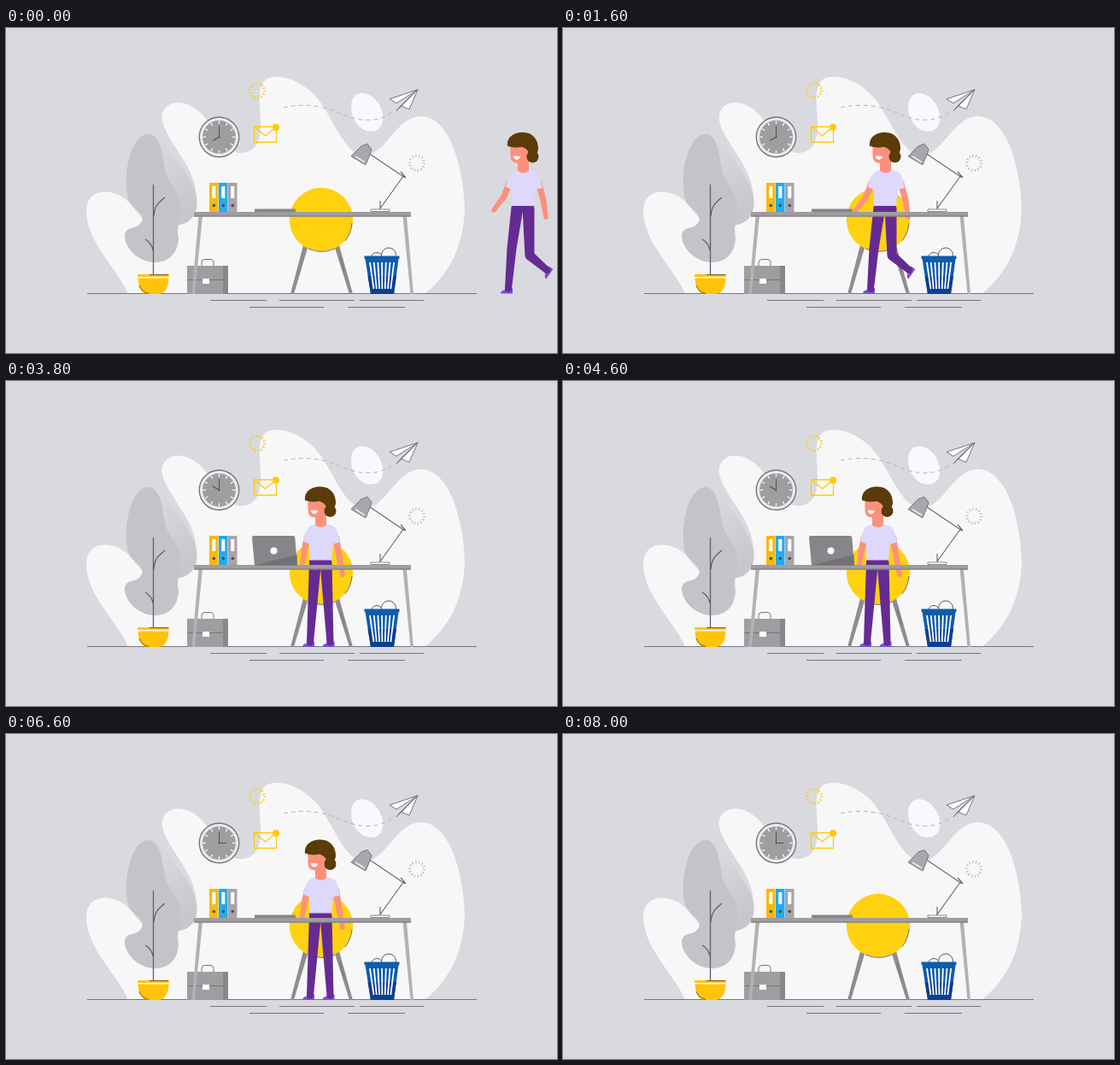
Animation of 645x380 px, one loop 8.2 s. Source, as an HTML page:

```html
<!DOCTYPE html>
<html lang="en">
<head>
<meta charset="utf-8">
<title>A day at the office</title>
<style>
html, body { margin: 0; width: 100%; height: 100%; overflow: hidden; background: #d9dadf; }
svg { display: block; width: 645px; height: 380px; }
.line { fill: none; stroke: #77747a; stroke-width: 1; }
</style>
</head>
<body>
<svg viewBox="0 0 645 380">
  <defs>
    <linearGradient id="shade" x1="0" y1="0" x2=".3" y2="1">
      <stop offset=".2" stop-color="#d7d8dc"/><stop offset="1" stop-color="#c6c6cb"/>
    </linearGradient>
  </defs>
  <!-- backdrop -->
  <path fill="#f7f7f8" d="M143 311C132 283 93 250 94 212C96 186 126 187 143 203C160 222 165 234 188 234C214 232 229 208 220 180C212 153 184 126 182.500 105C183 88 201 83 216 91C242 103 250 146 276 146C293 145 299 131 298 109C297 88 294 70 303 61C317 50 352 62 369 88C385 111 398 149 420 149C447 146 456 104 486 103C523 105 536 172 537 212C535 258 518 288 490 311Z"/>
  <path fill="#f9f9fd" d="M404 92C404 80 412 74 422 77C434 81 443 96 441 109C439 121 427 124 417 118C408 112 404 102 404 92Z"/>
  <path fill="url(#shade)" d="M180 126C192 145 217 172 223 197C226 218 216 230 197 231L175 200Z"/>
  <path fill="#c3c3c9" d="M168 124C181 126 183 148 186 166C190 184 203 189 204 207C205 222 199 231 202 246C201 264 190 275 172 274C154 273 138 256 139 242C141 230 154 237 159 226C163 216 148 212 143 200C136 172 146 123 168 124Z"/>
  <g class="line">
    <path stroke-width="1.300" stroke="#5f5f64" d="M172.500 290V183M173 220C174 207 179 204 186 198M172 260Q171 252 163 247"/>
    <path d="M95 310.500H551M239 318.500H305M320 318.500H408M414 318.500H489M285 326.500H372M400 326.500H467"/>
    <path stroke="#b5b5ba" stroke-dasharray="5 4" d="M325 93C350 87 375 92 392 100C412 109 434 112 453 98"/>
    <path fill="#fff" stroke-linejoin="round" d="M482 72L449 83L457 88ZL457 97L462 91ZL462 91L472 95Z"/>
  </g>
  <path fill="#ffc40a" d="M154 288H191V291H154ZM154.500 292.500H190.500C190 304 186 311 178 311H167C159 311 155 304 154.500 292.500Z"/>
  <path fill="none" stroke="#6b5a20" d="M168 288.500H190M156 301Q159 309 167 310.500"/>

  <circle cx="294" cy="73" r="8.500" fill="none" stroke="#ffca18" stroke-width="3" stroke-dasharray="1.300 2.510"/>
  <circle cx="481" cy="158" r="8.500" fill="none" stroke="#bbbbc0" stroke-width="3" stroke-dasharray="1.200 2.610"/>
  <path fill="none" stroke="#ffc907" stroke-width="1.300" d="M290.500 115.500H316.500V133.500H290.500ZL303.500 126L316 116"/>
  <circle cx="316" cy="116" r="4" fill="#ffc907"/>

  <g transform="translate(249.500 127.500)">
    <circle r="23.200" fill="#ececef" stroke="#77747a" stroke-width="1.400"/>
    <circle r="19.500" fill="#a09da1"/>
    <g id="ticks" stroke="#fff" stroke-width="1.200"></g>
    <path stroke="#4e4e53" d="M0 1V-13"/>
    <path id="hour" stroke="#4e4e53" d="M0 1V-8.500"/>
  </g>

  <!-- furniture behind the woman -->
  <g id="folders"></g>
  <path fill="#a09da1" d="M212 278H260V311H212Z"/>
  <path fill="#8a878c" d="M254 278H260V311H254Z"/>
  <path class="line" d="M229 278V274Q229 270.500 233 270.500H239Q243 270.500 243 274V278M212 294.500H254"/>
  <path fill="#fff" d="M230 293H238V299H230Z"/>
  <path fill="#8f8c92" d="M348 254H354L337 311H333ZM384 254H390L406 311H402Z"/>
  <circle cx="369" cy="224" r="37.200" fill="#ffd10f"/>
  <path class="line" d="M354 258Q369 265 385 258M391 267L396 285M405 228Q404 240 397 249"/>
  <g fill="#f8f8fa" stroke="#55585f"><circle cx="434" cy="269" r="6.500"/><circle cx="448" cy="265.500" r="8.500"/></g>
  <path fill="#0d5cae" d="M419.500 266.500H460.500V270H459.500L454 311H427L420.500 270H419.500Z"/>
  <path fill="#0b3f90" d="M423.500 290H457L454 311H427Z"/>
  <g id="slats" stroke="#fff" stroke-width="1.800"></g>

  <g id="woman"></g>

  <!-- desk, lamp and laptop in front -->
  <path fill="#b2b1b7" d="M225.500 220H230L221 311H217.500ZM464.500 220H469L477 311H473.500Z"/>
  <path fill="#a09da1" d="M220 215H474V220.500H220Z"/>
  <path class="line" d="M220 220H474"/>
  <path fill="none" stroke="#6c6a70" stroke-width="1.200" d="M438 211L466 172M467 175L424 146M438 202V212M462 168L468 175"/>
  <path fill="#a9a7ac" stroke="#77747a" d="M404 150L416 138L423 135.500L428 142L426 148L421 160Z"/>
  <path stroke="#e9e9ec" stroke-width="1.500" d="M409 150L420 157"/>
  <path fill="#fff" stroke="#8b898e" d="M427 212H449V214.500H427Z"/>
  <path id="closed" fill="#87858a" d="M291 211.500H339V215H291Z"/>
  <g id="open">
    <path fill="#87858a" d="M290 181H336Q338 181 338.300 183L341 215.500H291L288 183Q288 181 290 181Z"/>
    <path fill="#737177" d="M340.500 203L341 215.500H291Z"/>
    <circle cx="313.500" cy="198.500" r="4" fill="#fff"/>
  </g>
</svg>
<script>
const LOOP = 8200, STEP = 200;
const SKIN = '#fb917c', HAIR = '#5b3b08', SHIRT = '#ddd8fc', PANTS = '#652b93', SHOE = '#7951d8';
const $ = id => document.getElementById(id);
const path = (d, fill) => `<path fill="${fill}" d="${d}"/>`;
const move = (x, y, inner, flip = 1) => `<g transform="translate(${x} ${y}) scale(${flip} 1)">${inner}</g>`;
const repeat = (count, make) => Array.from({ length: count }, (_, i) => make(i)).join('');

$('ticks').innerHTML = repeat(12, i => `<path d="M0 -19V-15.500" transform="rotate(${i * 30})"/>`);
$('slats').innerHTML = repeat(7, i => `<path d="M${426 + i * 4.7} 274L${430.5 + i * 3.3} 305"/>`);
$('folders').innerHTML = ['#f9b90a', '#20abf2', '#a7a5aa'].map((fill, i) =>
  move(238 + i * 11, 181, path('M0 0H10.500V34H0Z', fill) + path('M3.300 4H7.300V18H3.300Z', '#fff') +
    '<circle cx="5.300" cy="26.500" r="1.800" fill="#51465a"/>')).join('');

// Tapered segment with a round far end.
function limb([x1, y1], [x2, y2], w1, w2, fill) {
  const len = Math.hypot(x2 - x1, y2 - y1), nx = (y1 - y2) / len / 2, ny = (x2 - x1) / len / 2;
  return path(`M${x1 + nx * w1} ${y1 + ny * w1}L${x2 + nx * w2} ${y2 + ny * w2}` +
    `A${w2 / 2} ${w2 / 2} 0 0 0 ${x2 - nx * w2} ${y2 - ny * w2}L${x1 - nx * w1} ${y1 - ny * w1}Z`, fill);
}

function leg(hip, knee, foot, tilt = 0) {
  const shoe = `<path fill="${SHOE}" transform="translate(${foot}) rotate(${tilt})" d="M-4 -1H5V5.500H-9Q-9 2 -4 1Z"/>`;
  return shoe + limb(hip, knee, 14, 11, PANTS) + limb(knee, foot, 11, 8, PANTS);
}

function arm(shoulder, elbow, hand) {
  return limb(shoulder, elbow, 8, 7, SKIN) + limb(elbow, hand, 7, 5.5, SKIN);
}

const head =
  path('M-14.500 134V150Q-14 158 -6 158V167Q1 172 7 167V134Z', SKIN) +
  path('M-18 138C-19 127 -10 122 0 122C12 122 18.500 131 18 142L16 148H7C7 143 4 141 -1 139Q-10 141 -18 138Z', HAIR) +
  `<circle cx="11.500" cy="150.500" r="7" fill="${HAIR}"/>` +
  path('M-11 149.500L-3 150Q-4 154 -7.500 154Q-11 153 -11 149.500Z', '#fff');
const torso = path('M-13 207H13V212H-13Z', PANTS) +
  path('M-9 167L-5 166Q1 171 7 166L12 167Q18 168 20 175L23 187L15 189L13 208H-13V189L-20 186Q-17 169 -9 167Z', SHIRT);

// Knee, foot and shoe tilt through one stride; the other leg runs half a stride later.
const stride = [
  [[-13, 258], [-17, 305], 0],
  [[-1, 258], [2, 305], 0],
  [[8, 266], [28, 283], -55],
  [[-9, 256], [5, 294], -25],
];

function walker(phase) {
  const wide = phase % 2 === 0;
  const front = phase === 0 || phase === 3 ? -6.5 : 6;
  return leg([-front, 210], ...stride[(phase + 2) % 4]) + leg([front, 210], ...stride[phase]) +
    arm([18, 180], [24, 201], wide ? [27, 221] : [25, 222]) +
    arm([-15, 180], wide ? [-22, 197] : [-20, 197], wide ? [-34, 213] : [-23, 214]) + torso + head;
}

function stander(swing) {
  return leg([-6, 210], [-9, 258], [-12, 304]) + leg([6.5, 210], [9, 258], [11.5, 304]) +
    arm([18, 180], [22, 203], [26 + swing, 225]) +
    arm([-15, 180], [-19, 198], [-21 + swing, 212]) + torso + head;
}

const seated =
  arm([350, 187], [340, 194], [332, 204]) +
  path('M337 308Q344 305 349.500 306V311.500H337ZM354 308Q361 305 366 306V311.500H354Z', SHOE) +
  path('M350 214H381Q386 235 379 244Q372 249 358 248L365 306H356L346 249H342L349.500 306H341L328 244Q327 236 336 235L348 233Z', PANTS) +
  path('M352 180L358 178Q364 182 370 178L377 179Q384 181 386 188L392 205L381 209V215H349L348 195L338 197Q340 184 352 180Z', SHIRT) +
  limb([388, 208], [345, 210], 11, 6, SKIN) +
  `<circle cx="388.500" cy="208" r="5.500" fill="${SKIN}"/>` + path('M375 193L383 188L391 202L377 206Z', SHIRT) +
  move(363, 13.5, head);

function woman(t) {
  const step = Math.floor(t / STEP);
  if (t < 1800) return move(605 - 28.5 * step, 0, walker(step % 4));
  if (t < 2800) return move(368, 1.5, stander(0));
  if (t < 3800) return seated;
  if (t < 5600) return move(368, 1.5, stander(2 * Math.sin((step - 23) * Math.PI / 4)));
  if (t < 6600) return seated;
  if (t < 6800) return move(368, 1.5, stander(0));
  if (t < 8000) return move(459 + 36.5 * (step - 36), 0, walker(step % 4), -1);
  return '';
}

let shown;
function draw(now) {
  const t = now % LOOP, picture = woman(t);
  if (picture !== shown) $('woman').innerHTML = shown = picture;
  const hour = t < 3800 ? 8 : t < 6600 ? 10 : 3;
  $('hour').setAttribute('transform', `rotate(${hour * 30})`);
  const working = t >= 2300 && t < 6600;
  $('open').style.display = working ? '' : 'none';
  $('closed').style.display = working ? 'none' : '';
}

let start;
function frame(now) {
  start ??= now;
  draw(now - start);
  requestAnimationFrame(frame);
}
draw(0);
requestAnimationFrame(frame);
</script>
</body>
</html>
```
